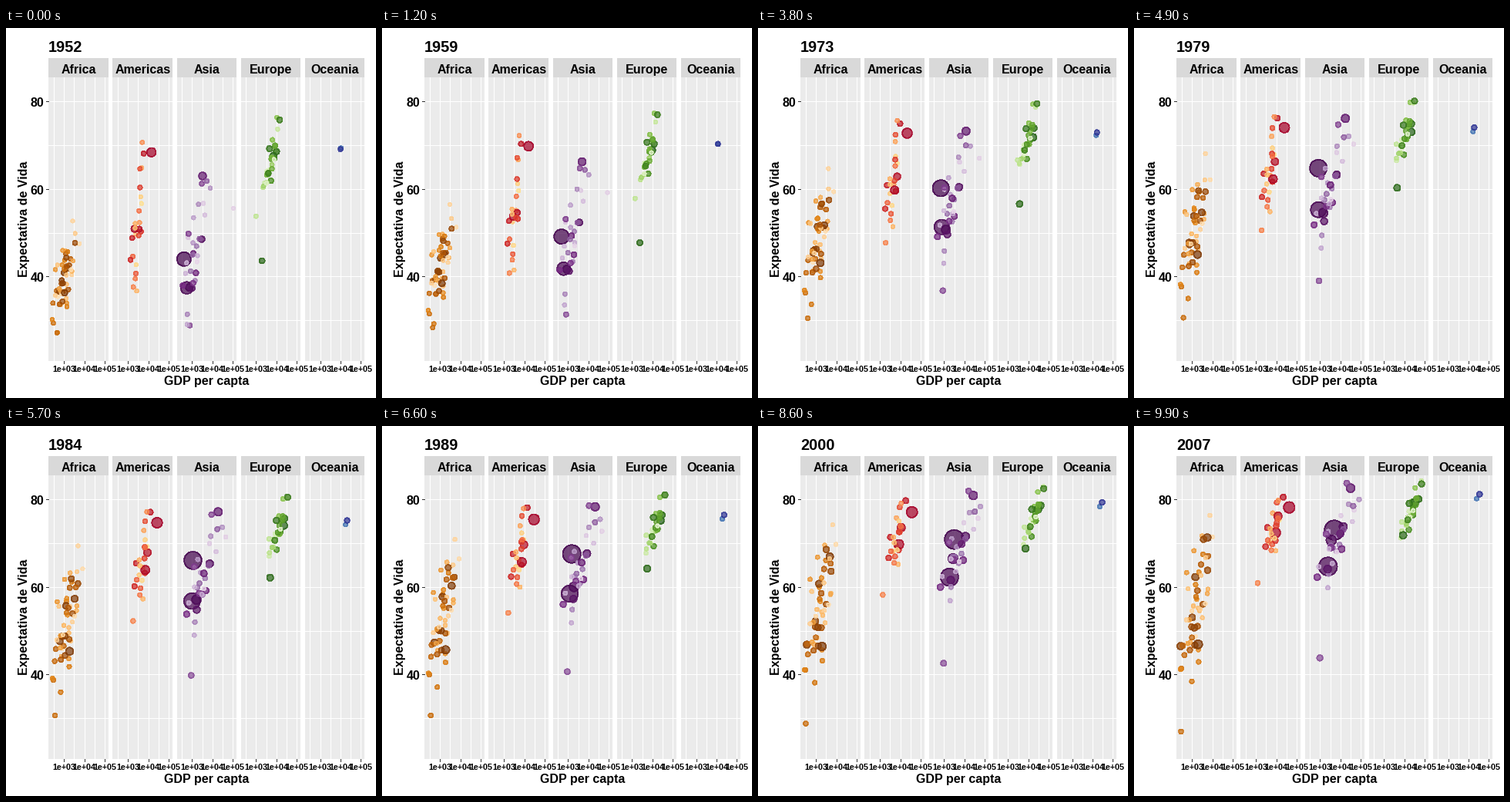
Recreate the animation shown at these times as a matplotlib script. Size 480 px wide and 480 px high, loop 10000 ms.

```python
import numpy as np
import matplotlib.pyplot as plt
from matplotlib.animation import FuncAnimation
from matplotlib.colors import LinearSegmentedColormap
from matplotlib.patches import Rectangle

SIZE, FRAMES = 480, 100
STRIP, TOP, BOTTOM = 39, 64, 432
LEFT, WIDTH, PITCH = 55.35, 77.6, 83.1
DECADE, MIN_LOG = 26.39, 2.248
UNIT, Y40 = 5.675, 322.4
MAX_POP = 1318.7

YEARS = np.linspace(1952, 2007, FRAMES)
T = np.linspace(0, 1, FRAMES)
rng = np.random.default_rng(7)

plt.rcParams.update({"font.family": "Liberation Sans", "font.weight": "bold"})
fig = plt.figure(figsize=(SIZE / 72, SIZE / 72), dpi=72, facecolor="white")
ax = fig.add_axes([0, 0, 1, 1])
ax.set(xlim=(0, SIZE), ylim=(SIZE, 0))
ax.axis("off")


def x_px(panel, log_gdp):
    return LEFT + panel * PITCH + (log_gdp - MIN_LOG) * DECADE


def y_px(life):
    return Y40 - (life - 40) * UNIT


def radius(pop):
    size = 2 + 10 * np.sqrt(pop / MAX_POP)
    return 0.375 * size * 2.845


def blend(start, end):
    return start + (end - start) * T


def key_path(values):
    return np.interp(YEARS, (1952, 1979, 2007), values)


def spread(n):
    """Standard scores that wander a little over the loop, one row per dot."""
    start = np.clip(rng.normal(size=(n, 1)), -2, 2)
    start = (start - start.mean()) / start.std()
    return blend(start, 0.9 * start + 0.4 * rng.normal(size=(n, 1)))


def line(x, y, color="white"):
    ax.plot(x, y, color=color, lw=1, antialiased=False,
            solid_capstyle="butt", zorder=1)


def draw_panel(panel, name):
    left = LEFT + panel * PITCH
    for y, h, c in ((STRIP, TOP - STRIP, "#D9D9D9"), (TOP, BOTTOM - TOP, "#EBEBEB")):
        ax.add_patch(Rectangle((left, y), WIDTH, h, fc=c, lw=0, antialiased=False))
    for v in range(30, 90, 10):
        line([left, left + WIDTH], [y_px(v)] * 2)
    for v in np.arange(2.5, 5.1, 0.5):
        line([x_px(panel, v)] * 2, [TOP, BOTTOM])
    for v in (3, 4, 5):
        x = x_px(panel, v)
        line([x, x], [BOTTOM, BOTTOM + 3], "#333333")
        ax.text(x, 446, f"1e+0{v}", size=10.6, ha="center")
    ax.text(left + WIDTH / 2, 59, name, size=16, ha="center")


def cloud(n, gdp, gdp_sd, life, life_sd, link, pop, growth):
    """Dots scattered around a moving trend, from most to least populous."""
    zg = spread(n)
    zl = link * zg + np.sqrt(1 - link ** 2) * spread(n)
    x = blend(*gdp) + blend(*gdp_sd) * zg
    y = np.interp(YEARS, (1952, 1972, 1992, 2007), life) + blend(*life_sd) * zl
    now = np.geomspace(*pop, n)[:, None]
    return x, y, blend(now / growth, now)


layers = []


def continent(name, ramp, trend, keys):
    """keys: rank -> (population, log10 GDP, life) at a few moments."""
    panel = len(layers)
    draw_panel(panel, name)
    x, y, pop = cloud(**trend)
    for rank, (people, gdp, life) in keys.items():
        x[rank], y[rank] = key_path(gdp), key_path(life)
        pop[rank] = blend(*people)
    shades = LinearSegmentedColormap.from_list(name, ramp)(np.linspace(0, 1, len(x)))
    shades[:, 3] = 0.7
    layers.append((x_px(panel, x), y_px(y), radius(pop), shades))


continent(
    "Africa", ["#7F3B08", "#B35806", "#E08214", "#FDB863", "#FEE0B6"],
    dict(n=52, gdp=(3, 3.2), gdp_sd=(0.29, 0.4), life=(39, 47.5, 53.6, 54.8),
         life_sd=(4.8, 9), link=0.6, pop=(80, 0.2), growth=3.7),
    {0: ((33, 135), (3.03, 3.27, 3.3), (36.3, 45, 46.9)),
     1: ((22, 80), (3.15, 3.48, 3.75), (41.9, 54.5, 71.3)),
     3: ((14, 65), (2.89, 2.87, 2.44), (39.1, 47.8, 46.5)),
     47: ((0.3, 0.8), (3.43, 3.66, 3.88), (52.7, 68, 76.4))})

continent(
    "Americas", ["#A50026", "#D73027", "#F46D43", "#FDAE61", "#FEE090"],
    dict(n=25, gdp=(3.48, 3.9), gdp_sd=(0.18, 0.24), life=(53, 62.5, 69.6, 73.6),
         life_sd=(8.5, 3.8), link=0.65, pop=(45, 1), growth=2.7),
    {0: ((158, 301), (4.15, 4.39, 4.63), (68.4, 74, 78.2)),
     1: ((57, 190), (3.32, 3.83, 3.96), (50.9, 62.2, 72.4)),
     2: ((30, 109), (3.54, 3.93, 4.08), (50.8, 66.2, 76.2)),
     14: ((3, 8.5), (3.26, 3.28, 3.08), (37.6, 50.5, 60.9))})

continent(
    "Asia", ["#40004B", "#762A83", "#9970AB", "#C2A5CF", "#E7D4E8"],
    dict(n=33, gdp=(3.13, 3.8), gdp_sd=(0.33, 0.48), life=(47, 58, 67, 71.5),
         life_sd=(8.5, 6), link=0.7, pop=(170, 0.7), growth=2.9),
    {0: ((556, 1318), (2.6, 2.91, 3.7), (44, 64.7, 73)),
     1: ((372, 1110), (2.74, 2.92, 3.39), (37.4, 55.2, 64.7)),
     2: ((82, 223), (2.87, 3.15, 3.55), (37.5, 54.4, 70.7)),
     5: ((86, 127), (3.51, 4.24, 4.5), (63, 76.1, 82.6)),
     12: ((8, 32), (2.89, 2.95, 2.99), (28.8, 39, 43.8)),
     31: ((0.2, 2.5), (5.03, 4.65, 4.67), (55.6, 70.2, 77.6))})

continent(
    "Europe", ["#276419", "#4D9221", "#7FBC41", "#B8E186", "#E6F5D0"],
    dict(n=30, gdp=(3.72, 4.37), gdp_sd=(0.21, 0.23), life=(66, 71.2, 74.6, 77.8),
         life_sd=(4, 2.8), link=0.85, pop=(62, 0.5), growth=1.35),
    {0: ((69, 82), (3.85, 4.33, 4.51), (67.5, 73, 79.4)),
     1: ((22, 71), (3.29, 3.64, 3.93), (43.6, 60.2, 71.8)),
     23: ((2.8, 4.5), (2.99, 3.6, 3.87), (53.8, 70.2, 74.9))})

continent(
    "Oceania", ["#313695", "#4575B4"],
    dict(n=2, gdp=(4, 4.5), gdp_sd=(0, 0), life=(69, 72, 77, 81),
         life_sd=(0, 0), link=0, pop=(20, 4), growth=2),
    {0: ((8.7, 20), (4, 4.28, 4.54), (69.1, 74, 81.2)),
     1: ((2, 4), (4.02, 4.22, 4.4), (69.4, 73.1, 80.2))})

for v in (40, 60, 80):
    line([LEFT - 3, LEFT], [y_px(v)] * 2, "#333333")
    ax.text(49.6, y_px(v) + 6.6, str(v), size=16, ha="right")
ax.text(260, 463, "GDP per capta", size=16, ha="center")
ax.text(31, 248, "Expectativa de Vida", size=16, rotation=90,
        ha="right", va="center")
title = ax.text(55, 31, "", size=20)

# Large bubbles lie at the back, the others in mixed order.
X, Y, R, shade = (np.vstack(part) for part in zip(*layers))
order = rng.permutation(len(X))
order = order[np.argsort(-np.maximum(R[order, 0], 7), kind="stable")]
X, Y, R, shade = X[order], Y[order], R[order], shade[order]

dots = ax.scatter(X[:, 0], Y[:, 0], s=(2 * R[:, 0]) ** 2, facecolors=shade,
                  edgecolors=shade, linewidths=0.8, antialiased=False, zorder=3)


def update(i):
    dots.set_offsets(np.column_stack([X[:, i], Y[:, i]]))
    dots.set_sizes((2 * R[:, i]) ** 2)
    title.set_text(f"{YEARS[i]:.0f}")
    return dots, title


anim = FuncAnimation(fig, update, frames=FRAMES, interval=100,
                     repeat=True, repeat_delay=0, blit=False)
plt.show()
```
